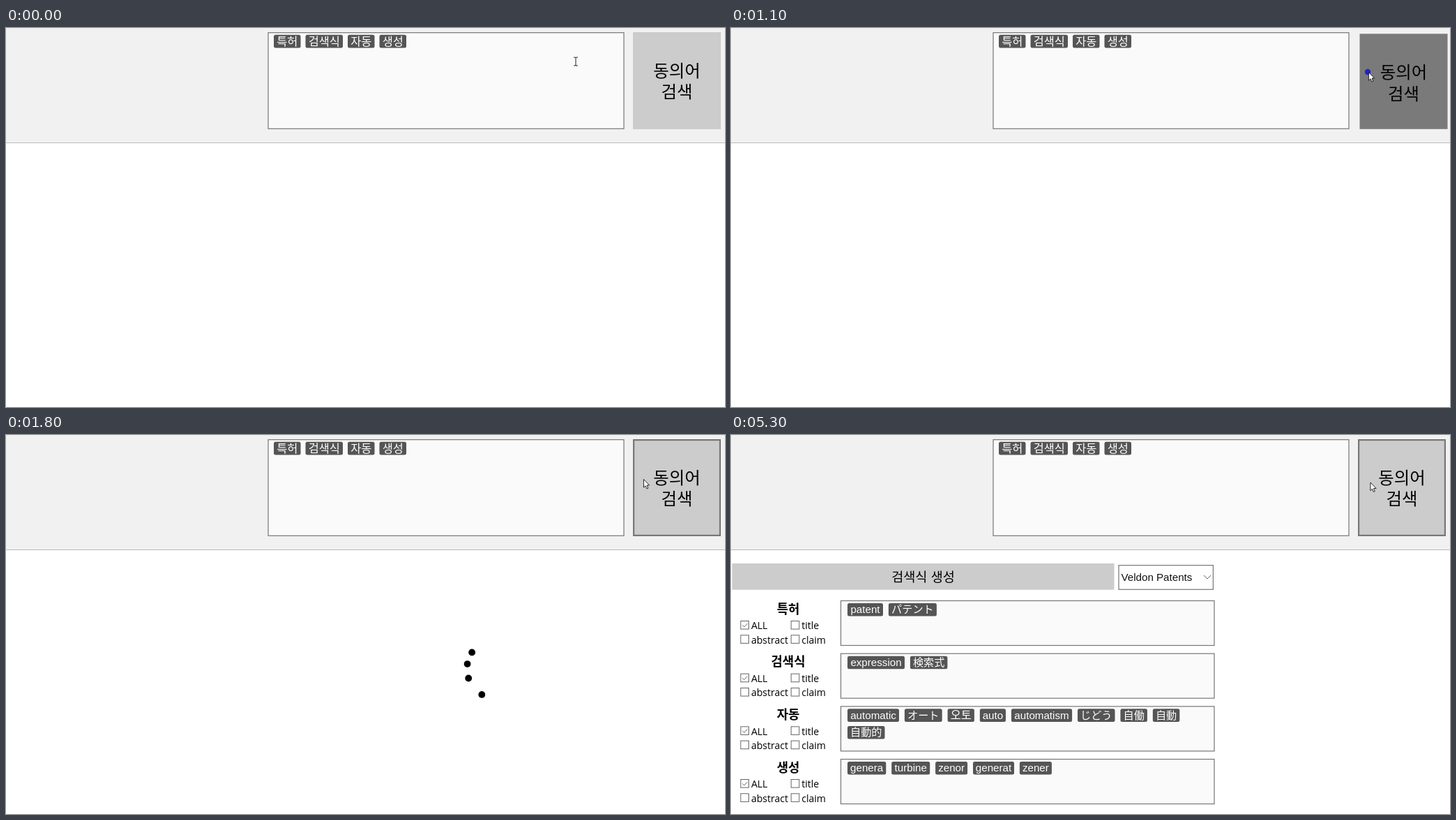
An HTML page that plays this animation: 1031 px wide and 543 px high, repeating every 8500 ms.

```html
<!DOCTYPE html>
<html lang="ko">
<head>
<meta charset="utf-8">
<style>
html, body { margin: 0; height: 100%; overflow: hidden; background: #fff; }
svg { display: block; }
text { font-family: "Liberation Sans", "Noto Sans CJK JP", sans-serif; font-size: 15.15px; }
.ko { font-family: "Noto Sans CJK KR", sans-serif; text-anchor: middle; }
.label { font-family: "Open Sans", sans-serif; font-size: 14.1px; }
.mid { text-anchor: middle; }
.line { fill: none; stroke: #666; }
.box { fill: #fafafa; stroke: #767676; }
</style>
</head>
<body>
<svg width="1031" height="543" viewBox="0 0 1031 543">
  <rect width="1031" height="164" fill="#f1f1f1"/>
  <path d="M0 164.5H1031" stroke="#bbb"/>
  <rect class="box" x="376" y="6.7" width="510" height="137.6" stroke-width="1.2"/>
  <g id="query"></g>
  <g id="button">
    <rect id="face" x="899" y="6" width="126" height="139"/>
    <rect id="edge" x="900.1" y="7.1" width="123.8" height="136.8" fill="none" stroke="#777" stroke-width="2.2"/>
    <g id="caption"></g>
  </g>
  <g id="results"></g>
  <g id="spinner"></g>
  <circle id="ripple" cx="913" cy="63" fill="none" stroke="#1414e6" stroke-width="4"/>
  <path id="beam" d="M-3 -6H-1L0 -5 1 -6H3M0 -5V5M-3 6H-1L0 5 1 6H3" fill="none" stroke="#333" stroke-width="1.1"/>
  <path id="arrow" d="M.4 .5V12.2L3 9.8 4.9 14 6.8 13.2 5 9H8.6Z" fill="#fff" stroke="#111" stroke-width=".9"/>
</svg>
<script>
const $ = id => document.getElementById(id);
const show = (id, on) => $(id).setAttribute('display', on ? 'inline' : 'none');
const move = (id, x, y) => $(id).setAttribute('transform', `translate(${x} ${y})`);

// Hangul centred on (x, y)
const hangul = (s, x, y, size, more = '') =>
  `<text class="ko" x="${x}" y="${y + size * .38}" style="font-size:${size}px" ${more}>${s}</text>`;

function tag(s, x, y, w) {
  const mid = x + w / 2;
  const word = /[가-힣]/.test(s)
    ? hangul(s, mid, y + 8.8, 16.4, 'fill="#fff"')
    : `<text class="mid" x="${mid}" y="${y + 14.3}" fill="#fff">${s}</text>`;
  return `<rect x="${x}" y="${y}" width="${w}" height="18.6" rx="2.5" fill="#555"/>` + word;
}

function tags(list, x, y, gap) {
  return list.map(([s, w]) => {
    const out = tag(s, x, y, w);
    x += w + gap;
    return out;
  }).join('');
}

function check(s, x, y, on) {
  return `<rect class="line" x="${x}" y="${y - 6.5}" width="11.6" height="11.6"/>` +
    (on ? `<path class="line" d="M${x + 2.3} ${y - .7}l2.6 2.7 4.7 -5"/>` : '') +
    `<text class="label" x="${x + 15}" y="${y + 5.2}">${s}</text>`;
}

function row([name, ...lines], i) {
  const y = 237.5 + i * 75.67;
  return hangul(name, 82, y + 11.5, 17.8, 'font-weight="bold"') +
    check('ALL', 13.9, y + 35.5, true) + check('title', 86.2, y + 35.5) +
    check('abstract', 13.9, y + 55.8) + check('claim', 86.2, y + 55.8) +
    `<rect class="box" x="157.5" y="${y}" width="535.5" height="64" stroke-width="1.2"/>` +
    lines.map((list, k) => tags(list, 167, y + 3.5 + k * 24.6, 7.9)).join('');
}

$('query').innerHTML = tags([['특허', 38.5], ['검색식', 53.5], ['자동', 38.5], ['생성', 38.5]], 384, 9.8, 7);
$('caption').innerHTML = hangul('동의어', 962, 60.5, 24.4) + hangul('검색', 962, 91, 24.4);

$('results').innerHTML =
  '<rect x="1.5" y="184" width="548" height="37.7" fill="#ccc"/>' +
  hangul('검색식 생성', 275.5, 202.8, 18.6) +
  '<rect x="556" y="186.7" width="135.4" height="34.6" fill="#fff" stroke="#767676" stroke-width="1.2"/>' +
  '<text x="559.5" y="209" fill="#111">Veldon Patents</text>' +
  '<path class="line" d="M678 201l5 5 5 -5"/>' +
  [
    ['특허', [['patent', 51], ['パテント', 69]]],
    ['검색식', [['expression', 82], ['検索式', 53.5]]],
    ['자동',
      [['automatic', 74], ['オート', 53.8], ['오토', 38.3], ['auto', 37.2], ['automatism', 87.2],
       ['じどう', 53.5], ['自働', 38.5], ['自動', 38.5]],
      [['自動的', 53.5]]],
    ['생성', [['genera', 55.3], ['turbine', 55], ['zenor', 46], ['generat', 59], ['zener', 46]]]
  ].map(row).join('');

// Dot angle, clockwise from the top, every 100 ms of its age
const ANGLES = [170, 208, 231, 250.5, 268, 279, 291.5, 303.5, 315, 326.6];

function dot(age) {
  if (age < 7) return '';
  const k = Math.min(Math.floor(age / 100), ANGLES.length - 2);
  const deg = ANGLES[k] + (ANGLES[k + 1] - ANGLES[k]) * (age / 100 - k);
  const a = deg * Math.PI / 180;
  return `<circle cx="${703.7 + 42.7 * Math.sin(a)}" cy="${335 - 42.7 * Math.cos(a)}" r="4.9"/>`;
}

function draw(now) {
  const t = Math.floor(now % 8500 / 100) * 100;
  const pressed = t === 1100, hover = t >= 900, loading = t >= 1200 && t < 2100;

  show('beam', t < 800);
  show('arrow', t >= 800);
  move('beam', ...(t < 700 ? [817, 48] : [840, 52]));
  move('arrow', ...(t < 900 ? [890, 61] : t < 5300 ? [914, 63] : [916.5, 67.5]));

  $('face').setAttribute('fill', pressed ? '#7a7a7a' : '#ccc');
  $('face').setAttribute('height', pressed ? 136.5 : 139);
  move('button', ...(pressed ? [2.5, 2.3] : [0, 0]));
  show('edge', hover && !pressed);

  const k = (t - 1100) / 100;
  show('ripple', k >= 0 && k < 5);
  if (k >= 0 && k < 5) {
    $('ripple').setAttribute('r', 2.2 + 4 * k);
    $('ripple').setAttribute('opacity', .87 - .18 * k);
  }

  $('spinner').innerHTML = loading
    ? [0, 1, 2, 3, 4].map(i => dot(t - 1100 - 197 * i)).join('') : '';
  show('results', t >= 2100);
}

let start;
function tick(now) {
  start ??= now;
  draw(now - start);
  requestAnimationFrame(tick);
}
draw(0);
requestAnimationFrame(tick);
</script>
</body>
</html>
```
